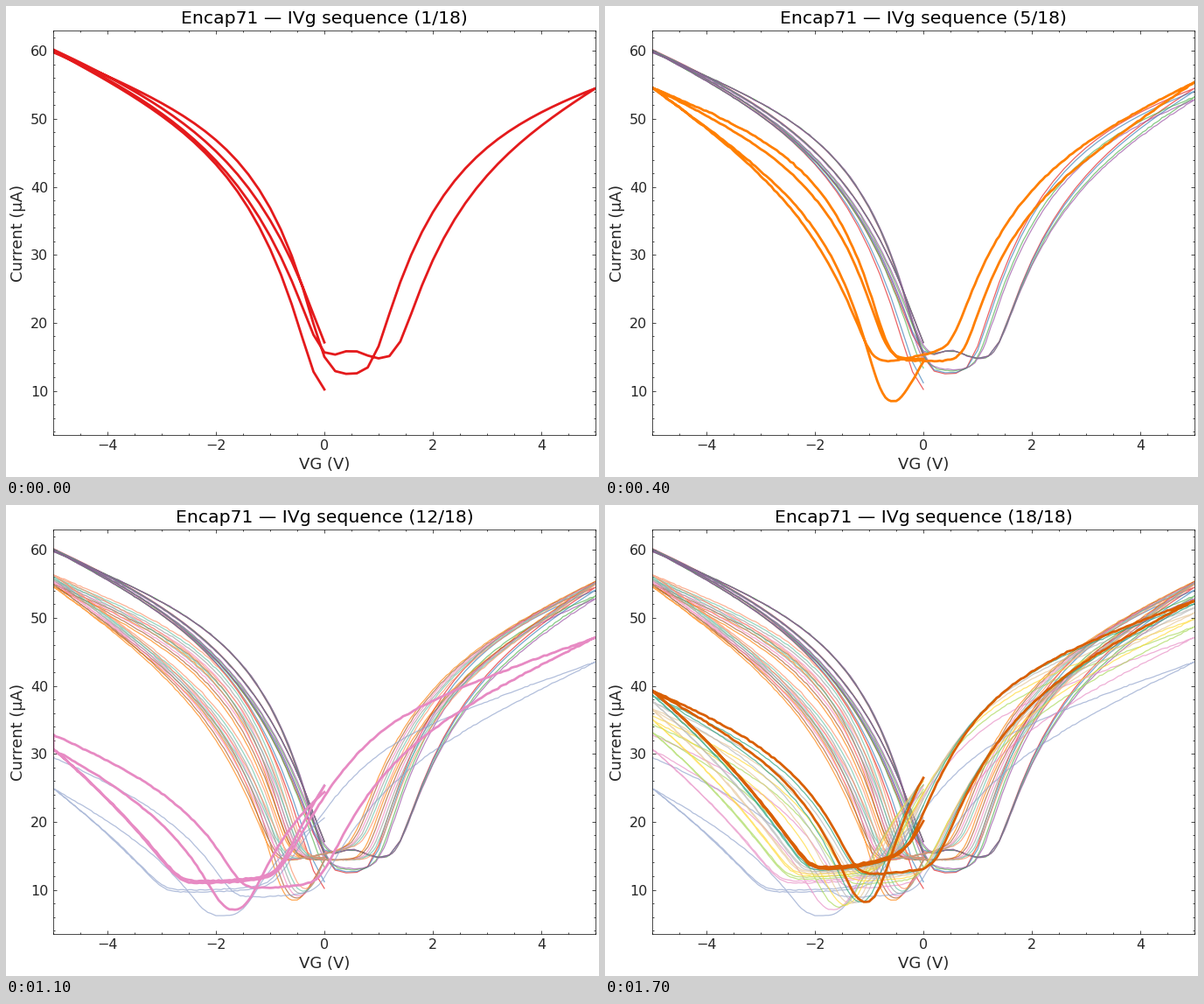
Animation of 678 by 538 pixels, one loop 1800 ms. Source, as a matplotlib script:

```python
import numpy as np
import matplotlib.pyplot as plt
from matplotlib.animation import FuncAnimation
from matplotlib.ticker import AutoMinorLocator, MultipleLocator

W, H, DPI = 678, 538, 100
SOFT = .1  # rounding of the knee where an arm leaves the valley, in volts
SET1, SET2, DARK2 = (plt.get_cmap(n).colors for n in ("Set1", "Set2", "Dark2"))
COLORS = [c for i, c in enumerate(SET1) if i != 5] + list(SET2)
COLORS += [DARK2[0], DARK2[1]]
COUNT = len(COLORS)
rng = np.random.default_rng(71)


def arm(u, reach, height, tau, slope):
    """Saturating rise plus a straight slope, worth height at u = reach."""
    s = SOFT * np.logaddexp(0, u / SOFT)
    rise = (height - slope * reach) / (1 - np.exp(-reach / tau))
    return rise * (1 - np.exp(-s / tau)) + slope * s


def sweep(start, stop, floor, left, right=None, tilt=0, hump=0, step=.05):
    """One gate sweep; left and right are (foot, end value, tau, slope)."""
    x = np.linspace(start, stop, int(round(abs(stop - start) / step)) + 1)
    base = lambda v: floor + tilt * np.tanh(v)
    y = base(x) + hump * np.exp(-((x - .5) / .35) ** 2)
    for side, spec in ((-1, left), (1, right)):
        if spec:
            foot, end, tau, slope = spec
            limit = side * max(side * start, side * stop)
            y += arm(side * (x - foot), side * (limit - foot),
                     end - base(limit), tau, slope)
    if step < .1:
        y += rng.normal(0, .04, len(y))
    return x, y


def join(*sweeps):
    return [np.concatenate(part) for part in zip(*sweeps)]


def pristine(t, step):
    """Runs 1 to 4: t drifts from 0 to 1."""
    end = 54.5 - 1.7 * t
    return join(
        sweep(0, -5, 14, (.08, 60.2 - .2 * t, 1.2, 3.4), step=step),
        sweep(-5, 5, 14.5, (-.08 + .1 * t, 60, 1.25, 3.5),
              (1.35, end, .97, 4.5), hump=1.4, step=step),
        sweep(5, -5, 12.4 + .7 * t, (0, 59.8, .87, 3.3),
              (.9 + .14 * t, end, 1.05, 2.5), step=step),
        sweep(-5, 0, 9.5 + 2.8 * t, (-.15 + .17 * t, 60, 1 + .1 * t, 4),
              step=step))


def shifted(n):
    """Runs 5 to 10: the valley slides right and the left end climbs."""
    d = .05 * (n - 2.3)
    low, high = 54.6 + .35 * n, 55.4 - .1 * n
    return join(
        sweep(0, -5, 14.7, (d - .57, low, .85, 3.8)),
        sweep(-5, 5, 15.3, (d - .85, low, .95, 5.5), (d + .65, high, 1, 3.7),
              tilt=1.8),
        sweep(5, -5, 14.4, (d - .54, low, .8, 3.2), (d + .88, high, .68, 5.4)),
        sweep(-5, 0, 7.7 + .3 * n, (d - .68, low, .68, 5.7),
              (d - .3, 14.2, 1, 1)))


def doped(n):
    """Runs 11 to 18: a recovery that is quick at first and then slows."""
    q = (n / 7) ** .56
    g = (1 - q) ** 1.25
    low, down_low, high = 39.3 - 14.4 * g, 39.3 - 9.8 * (1 - q), 52.5 - 9 * g
    floor, foot = 16.8 - 3.2 * g, -.9 + .65 * q * q
    left = (-2.95 + .85 * q, low, 3, 3.5)
    return join(
        sweep(0, -5, floor + .3, left, (foot, 25.5 - 5.5 * q ** 3, 1, 2.8),
              tilt=4),
        sweep(-5, 5, floor, left, (foot, high, 1.05, 2.8), tilt=4),
        sweep(5, -5, 13 - 3.2 * g, (-1.7 + .45 * q, down_low, .85, 3.4),
              (-.1 + .35 * q * q, high, 1.06, 3.8), tilt=1),
        sweep(-5, 0, 7.5 - 1.4 * g, (-2.2 + .95 * q, low, .8, 4.3),
              (-1.5 + .65 * q * q, 26.5 - 6 * g * g, 1, 2)))


runs = [pristine(t, .2 if t < .5 else .05) for t in (0, .25, .75, 1)]
runs += [shifted(n) for n in range(6)]
runs += [doped(n) for n in range(8)]

plt.rcParams.update({"font.family": "DejaVu Sans", "axes.linewidth": .5})
fig = plt.figure(figsize=(W / DPI, H / DPI), dpi=DPI, facecolor="white")
ax = fig.add_axes([54 / W, 48 / H, 620 / W, 462 / H])
ax.set(xlim=(-5, 5), ylim=(3.5, 63))
ax.xaxis.set_major_locator(MultipleLocator(2))
ax.yaxis.set_major_locator(MultipleLocator(10))
ax.xaxis.set_minor_locator(AutoMinorLocator(4))
ax.yaxis.set_minor_locator(AutoMinorLocator(5))
ax.tick_params(which="both", direction="in", top=True, right=True, width=.5,
               labelsize=11.5, labelcolor="#262626")
ax.tick_params(which="major", length=3)
ax.tick_params(which="minor", length=1.5)
ax.tick_params(axis="y", pad=4.2)
ax.set_xlabel("VG (V)", fontsize=13, color="#262626")
ax.set_ylabel("Current (µA)", fontsize=13, color="#262626", labelpad=3.3)
title = ax.set_title("", fontsize=14.65, color="black", pad=6)
lines = [ax.plot(x, y, color=c)[0] for (x, y), c in zip(runs, COLORS)]


def update(frame):
    for i, line in enumerate(lines):
        current = i == frame
        line.set_visible(i <= frame)
        line.set_linewidth(2 if current else .9)
        line.set_alpha(1 if current else .68)
    title.set_text(f"Encap71 — IVg sequence ({frame + 1}/{COUNT})")
    return [*lines, title]


anim = FuncAnimation(fig, update, frames=COUNT, interval=100,
                     init_func=lambda: update(0), repeat=True, repeat_delay=0)
plt.show()
```
